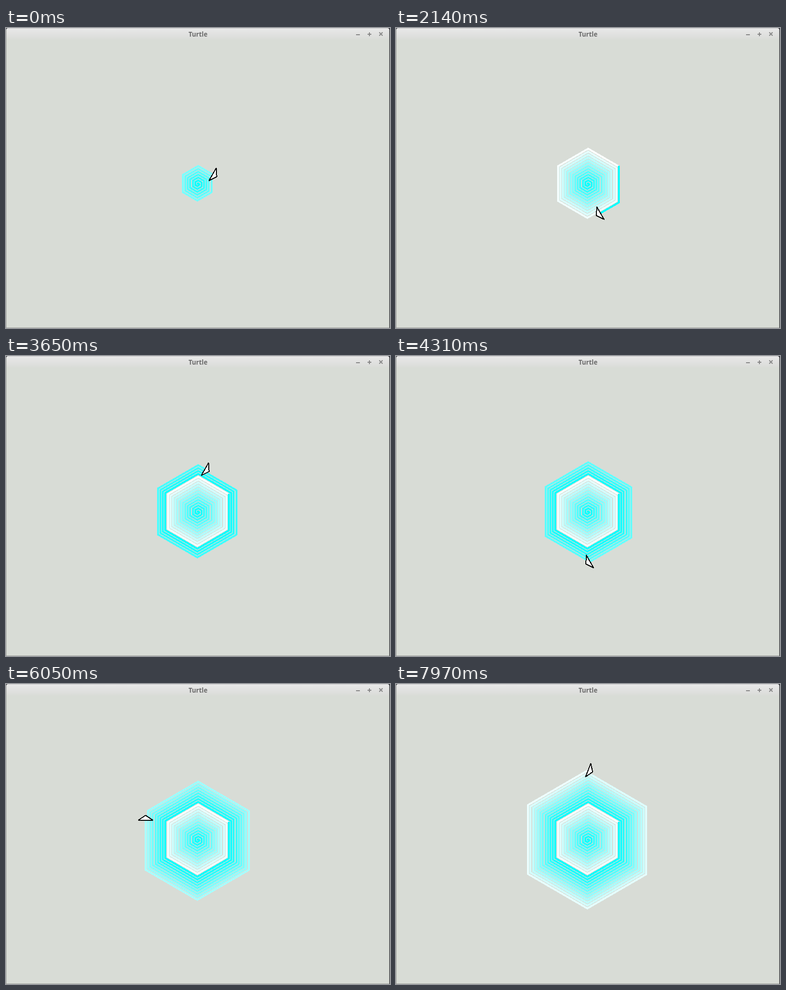
Animation, 803 px wide and 625 px high, one loop 8 s. Source, as an HTML page:

```html
<!DOCTYPE html>
<html lang="en">
<head>
<meta charset="utf-8">
<title>Turtle</title>
<style>
  html, body { margin: 0; width: 100%; height: 100%; overflow: hidden; background: #d8dcd6; }
  svg { display: block; width: 803px; height: 625px; }
  .title { font: bold 13.33px "Open Sans", "Noto Sans", sans-serif; fill: #6b6b6b; text-anchor: middle; }
  .spiral line { stroke-width: 4; stroke-linecap: round; }
  .crisp { shape-rendering: crispEdges; }
</style>
</head>
<body>
<svg viewBox="0 0 803 625">
  <defs>
    <linearGradient id="bar" x1="0" y1="0" x2="0" y2="1">
      <stop offset="0" stop-color="#e9e9e9"/>
      <stop offset=".75" stop-color="#dddedc"/>
      <stop offset="1" stop-color="#d8dcd6"/>
    </linearGradient>
  </defs>
  <rect width="803" height="625" fill="#d8dcd6"/>
  <rect width="803" height="25" fill="url(#bar)"/>
  <g class="crisp">
    <path d="M0 0h803v1H0z" fill="#c4c4c4"/>
    <path d="M0 2h1v623H0zM801 2h1v623h-1zM0 624h802v1H0z" fill="#9b9d9a"/>
    <path d="M802 0h1v625h-1zM0 0h3v1h-2v2H0zM799 0h3v3h-1v-2h-2z" fill="#33343a"/>
  </g>
  <text class="title" x="401.5" y="18">Turtle</text>
  <path d="M732 14h8M756 13h8M760 9v8M780.5 9l7 7M787.5 9l-7 7" fill="none" stroke="#858585" stroke-width="2"/>
  <g class="spiral crisp" id="spiral"></g>
  <polygon class="crisp" id="arrow" points="0,-15 10,0 0,15" fill="#fff" stroke="#000" stroke-width="2" stroke-linejoin="round"/>
</svg>
<script>
  const LOOP = 8000, FIRST = 38, LAST = 146, CYCLE = 75;
  const CX = 401, CY = 325, TURNS = 21, HOP = 3.3;
  const spiral = document.getElementById('spiral');
  const arrow = document.getElementById('arrow');

  const heading = n => -90 + 60 * n;
  const hops = n => 1 + Math.floor(n / HOP);
  const polar = (r, deg) => [r * Math.cos(deg * Math.PI / 180), r * Math.sin(deg * Math.PI / 180)];

  // Start of side n, which is n pixels long
  function vertex(n) {
    const a = heading(n), [x, y] = polar(n, a - 120), [dx, dy] = polar(1, a);
    return [CX + x + dx, CY + y + dy];
  }

  const lines = [];
  for (let n = 0; n <= LAST; n++) {
    const el = document.createElementNS('http://www.w3.org/2000/svg', 'line');
    const red = Math.round(255 * (n % CYCLE) / CYCLE);
    el.setAttribute('stroke', `rgb(${red},255,255)`);
    spiral.appendChild(el);
    lines.push(el);
  }

  // Steps taken before each side: a turn, then the hops along it
  const begin = [];
  for (let n = FIRST, sum = 0; n <= LAST + 1; n++) {
    begin[n] = sum;
    sum += TURNS + hops(n);
  }

  // Pace: time, side, progress (0-1 turning, 1-2 moving)
  const pace = [
    [0, 38, 1.93], [1300, 62, 1.8], [2990, 89, 1.317], [4310, 106, 1.928],
    [6050, 126, 1.81], [7250, 139, 1], [7970, 146, 0.857]
  ].map(([t, n, u]) => [t, begin[n] + (u < 1 ? u * TURNS : TURNS + (u - 1) * hops(n))]);

  // Runs of 60 ms ticks, each starting after a short stall
  const runs = [260, 630, 1000, 2450];
  function tick(t) {
    let start = 0;
    for (const r of runs) if (t >= r) start = r;
    if (!start) return 0;
    const next = runs[runs.indexOf(start) + 1] || LOOP + 130;
    return Math.min(start + Math.floor((t - start) / 60) * 60, next - 130);
  }

  function stepAt(t) {
    let k = 1;
    while (k < pace.length - 1 && t > pace[k][0]) k++;
    const [t0, s0] = pace[k - 1], [t1, s1] = pace[k];
    return Math.round(s0 + (s1 - s0) * Math.min(1, (t - t0) / (t1 - t0)));
  }

  function setLine(n, part) {
    const [x, y] = vertex(n), [dx, dy] = polar(n * part, heading(n));
    const el = lines[n];
    el.setAttribute('x1', x);
    el.setAttribute('y1', y);
    el.setAttribute('x2', x + dx);
    el.setAttribute('y2', y + dy);
    return [x + dx, y + dy];
  }

  function draw(step) {
    let n = FIRST;
    while (n < LAST && step >= begin[n + 1]) n++;
    const done = step - begin[n];
    const turn = Math.min(1, done / TURNS);
    const part = Math.max(0, done - TURNS) / hops(n);
    lines.forEach((el, i) => {
      el.style.display = i < n || (i === n && part > 0) ? '' : 'none';
      if (i < n) setLine(i, 1);
    });
    const [x, y] = setLine(n, part);
    arrow.setAttribute('transform', `translate(${x} ${y}) rotate(${heading(n - 1 + turn)})`);
  }

  let shown = -1;
  function frame() {
    const step = stepAt(tick(performance.now() % LOOP));
    if (step !== shown) draw(shown = step);
    requestAnimationFrame(frame);
  }
  frame();
</script>
</body>
</html>
```
